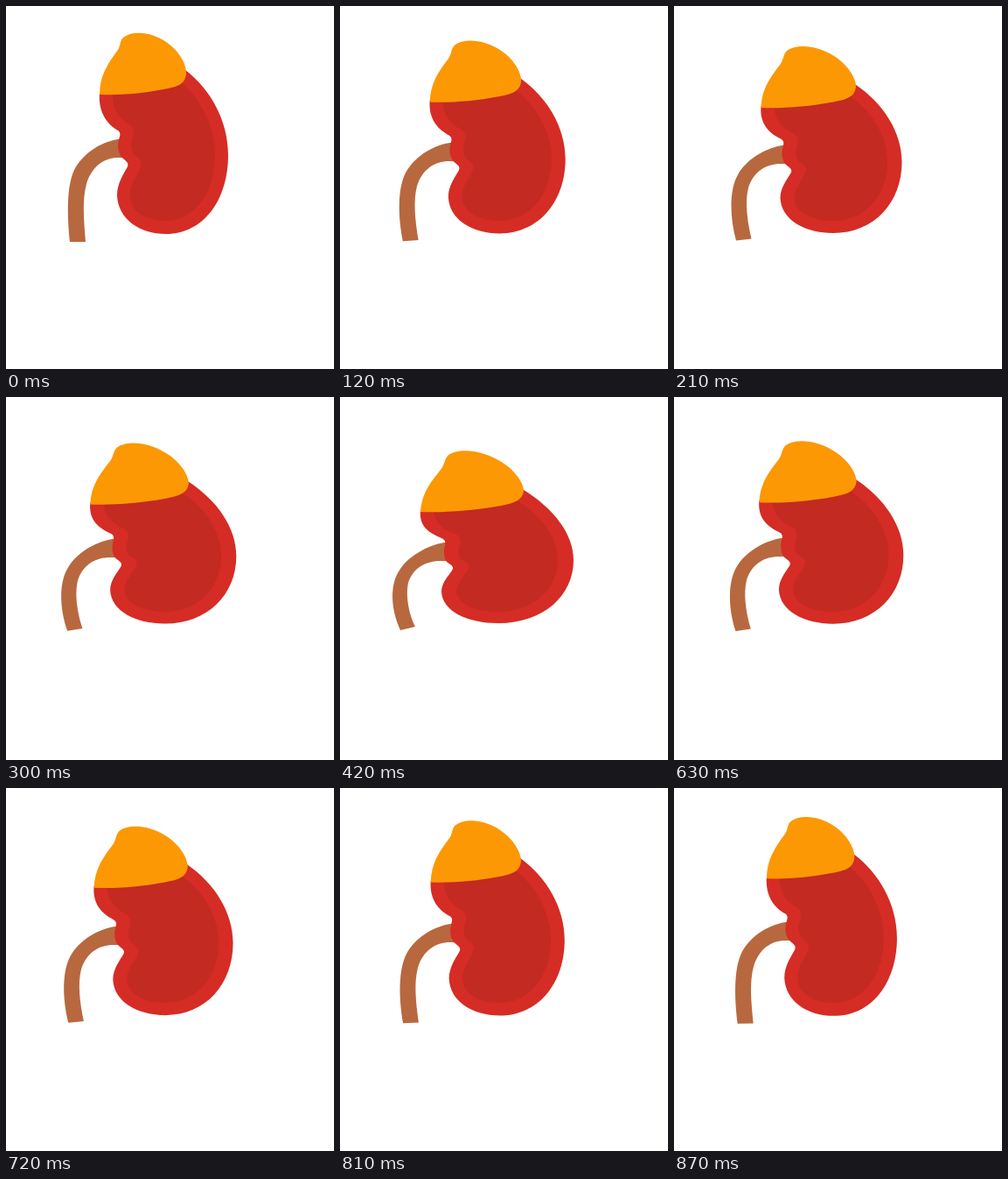
An HTML page for the animation above (0.9 s loop, 375 by 414 pixels).

```html
<!DOCTYPE html>
<html lang="en">
<head>
<meta charset="utf-8">
<title>Kidney</title>
<style>
html, body { margin: 0; width: 100%; height: 100%; overflow: hidden; background: #fff; }
svg { display: block; width: 100%; height: 100%; }
</style>
</head>
<body>
<svg viewBox="0 0 375 414"></svg>
<script>
const PERIOD = 900, STEP = 30, POSE_TIME = 420;

// Each part has its tall pose at 0 ms and its squashed pose at POSE_TIME.
const parts = [
  { fill: '#b8683f', // ureter
    tall: 'M134 152L128 152C105 156 87 170 78 187C69 206 70 240 73 269L91 269C89 243 87 221 92 203C98 183 112 173 128 173L134 173Z',
    squashed: 'M125 166L119 166C100 169 78 182 69 196C57 212 57 240 69 266L86 262C78 246 75 226 78 212C84 193 101 186 118 187L125 187Z' },
  { fill: '#d52c25', // rim
    tall: 'M107 99C105 122 117 136 128 142C131 144 131 147 129 152C127 160 128 169 134 174C139 178 141 180 138 185C134 192 127 203 127 216C128 243 153 260 183 260C226 260 254 221 254 170C254 131 234 95 205 73Z',
    squashed: 'M92 129C90 149 103 155 116 161C120 163 121 165 120 169C118 176 119 184 122 188C128 192 131 194 128 198C124 204 116 212 116 222C117 245 147 258 181 258C232 258 267 227 267 186C267 156 244 127 210 106Z' },
  { fill: '#c32a22', // core
    tall: 'M122 98C121 117 130 128 140 134C146 138 147 143 145 149C142 156 143 165 147 170C153 174 156 178 154 183C151 193 142 203 142 215C142 234 159 245 183 245C216 245 239 212 239 170C239 137 222 105 200 87Z',
    squashed: 'M107 128C109 147 121 152 132 156C138 159 139 164 137 170C134 177 136 183 139 186C146 188 149 192 147 196C143 204 133 212 133 222C134 236 156 245 181 245C222 245 249 218 249 186C249 160 230 134 200 117Z' },
  { fill: '#fc9804', // adrenal gland
    tall: 'M107 101C107 80 116 66 128 50C131 45 130 40 134 36C145 27 168 30 183 41C198 51 207 67 206 78C204 90 196 92 180 95C155 100 130 102 107 101Z',
    squashed: 'M92 131C94 108 104 97 115 83C120 77 119 71 124 66C136 58 160 60 181 72C198 81 210 97 210 107C209 117 200 121 184 124C150 130 118 132 92 131Z' }
];

const svg = document.querySelector('svg');
for (const part of parts) {
  part.path = document.createElementNS(svg.namespaceURI, 'path');
  part.path.setAttribute('fill', part.fill);
  part.target = part.squashed.match(/\d+/g).map(Number);
  svg.append(part.path);
}

function morph(from, target, k) {
  let i = 0;
  return from.replace(/\d+/g, n => (+n + (target[i++] - n) * k).toFixed(2));
}

function draw() {
  const t = Math.floor(performance.now() % PERIOD / STEP) * STEP;
  const k = (PERIOD / 2 - Math.abs(t - PERIOD / 2)) / POSE_TIME;
  for (const { path, tall, target } of parts) path.setAttribute('d', morph(tall, target, k));
  requestAnimationFrame(draw);
}
draw();
</script>
</body>
</html>
```
